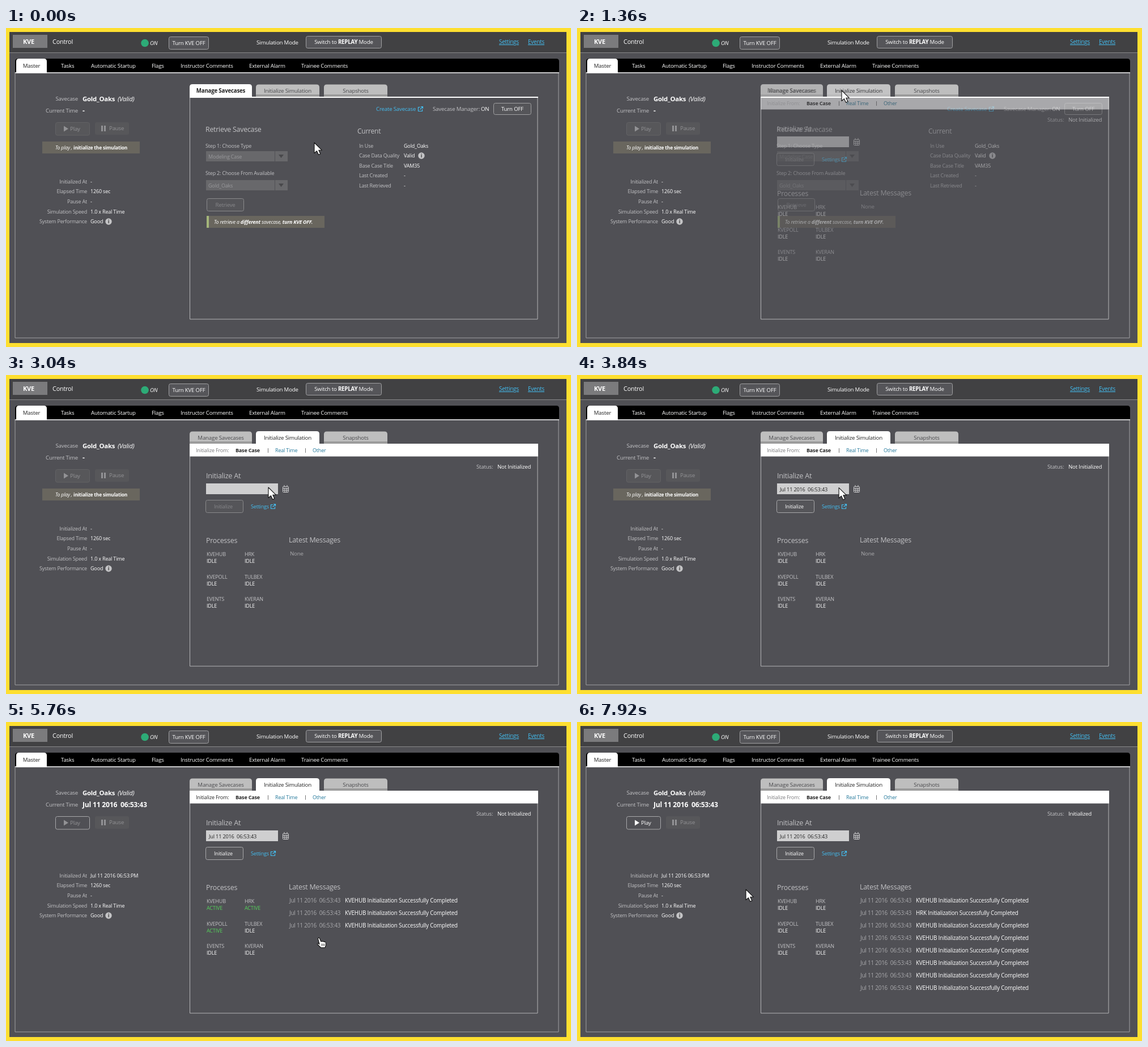
Write an HTML page that moves like this. It is 997x562 px and loops after 8000 ms.

```html
<!DOCTYPE html>
<html lang="en">
<head>
<meta charset="utf-8">
<title>Simulation control</title>
<style>
html, body { margin: 0; width: 100%; height: 100%; overflow: hidden; background: #fedf30; }
svg { display: block; width: 997px; height: 562px; }
text { font-family: "Open Sans", "Noto Sans", sans-serif; letter-spacing: -.02em; }
</style>
</head>
<body>
<svg id="stage" viewBox="0 0 997 562" xmlns="http://www.w3.org/2000/svg"></svg>
<script>
const LOOP = 8000;
const S = 9, M = 9.7, L = 12.4;
const BG = '#505055', WHITE = '#fff', PALE = '#c2c2c5', DIM = '#88888b', LINK = '#43bdf0', BLUE = '#23789b';
const STAMP = 'Jul 11 2016\u00a0\u00a006:53:43';

// y is the middle of the capitals; *stars* mark bold words
function text(x, y, str, size = M, fill = WHITE, attrs = '') {
  const body = str.replace(/\*(.+?)\*/g, '<tspan font-weight="700">$1</tspan>');
  return `<text x="${x}" y="${y + size * .36}" font-size="${size}" fill="${fill}" ${attrs}>${body}</text>`;
}
const MID = 'text-anchor="middle"', END = 'text-anchor="end"', BOLD = 'font-weight="700"', ITALIC = 'font-style="italic"';
const rect = (x, y, x2, y2, fill, attrs = '') =>
  `<rect x="${x}" y="${y}" width="${x2 - x}" height="${y2 - y}" fill="${fill}" ${attrs}/>`;
const path = (d, fill, attrs = '') => `<path d="${d}" fill="${fill}" ${attrs}/>`;
const button = (x, y, x2, y2, label, color = WHITE, stroke = '#a0a0a2', size = M) =>
  rect(x + .5, y + .5, x2 - .5, y2 - .5, '#555559', `rx="3" stroke="${stroke}"`) +
  text((x + x2) / 2, (y + y2) / 2, label, size, color, MID);
const info = (x, y) => `<circle cx="${x}" cy="${y}" r="5.7" fill="#c4c4c6"/>` +
  text(x, y, 'i', 9, '#444', MID + ' font-weight="700"');
const external = (x, y) => path(`M${x + 4} ${y + 1.5}h-3.5v7h7v-3.5M${x + 3.5} ${y + 5.5}l5-5m-3.5 0h3.5v3.5`,
  'none', `stroke="${LINK}" stroke-width="1.2"`);
const tabShape = (x, x2, y, y2, fill) =>
  path(`M${x} ${y2}V${y + 5}q0 -5 5 -5H${x2 - 5}q5 0 5 5V${y2}z`, fill);

function tab(x, x2, label, active, weight = '') {
  const shape = active ? tabShape(x, x2, 99, 123, WHITE)
    : tabShape(x, x2, 99.5, 121, '#bebebe') + rect(x, 117, x2, 121, '#9b9b9b');
  return shape + text((x + x2) / 2, 110.5, label, M, active ? '#222' : '#4b4b4e', MID + weight);
}

function frame() {
  const menu = [[97, 'Tasks'], [150, 'Automatic Startup'], [257, 'Flags'], [308, 'Instructor Comments'],
    [429, 'External Alarm'], [521, 'Trainee Comments']];
  return rect(0, 0, 997, 562, '#fedf30') + rect(6, 7, 989, 555, BG) +
    rect(6, 7, 989, 43, '#414143') + rect(6, 43, 989, 44, '#89898b') +
    rect(12, 12, 73, 35, '#7b7b7d') + text(40, 24, 'KVE', 11, WHITE, MID + ' ' + BOLD) +
    text(82, 24, 'Control', 10.9) +
    '<circle cx="245" cy="26.5" r="6.8" fill="#2dab77"/>' + text(254, 27, 'ON', M, WHITE, ITALIC) +
    button(287, 15, 358, 38, 'Turn KVE OFF') + text(442, 25.5, 'Simulation Mode') +
    button(529, 14, 663, 36, 'Switch to *REPLAY* Mode') +
    text(870, 24.5, 'Settings', 9.9, LINK, 'text-decoration="underline"') +
    text(921, 24.5, 'Events', 9.9, LINK, 'text-decoration="underline"') +
    path('M16 78V546H975V78', 'none', 'stroke="#a0a0a3"') +
    tabShape(16, 976, 54, 78, '#000') + rect(16, 78, 976, 79.6, '#e8e8e8') +
    tabShape(18, 72, 54, 79.5, WHITE) + text(45, 66.5, 'Master', M, '#222', MID) +
    menu.map(([x, s]) => text(x, 66.5, s)).join('');
}

function sidebar() {
  const rows = ['Initialized At', 'Elapsed Time', 'Pause At', 'Simulation Speed', 'System Performance'];
  const values = ['', '1260 sec', '-', '1.0 x Real Time', 'Good'];
  return text(127, 125, 'Savecase', M, PALE, END) + text(135, 124.5, 'Gold_Oaks', 11.4, WHITE, BOLD) +
    text(197, 124.5, '(Valid)', 11.3, WHITE, ITALIC) + text(127, 145.5, 'Current Time', M, PALE, END) +
    rect(157, 166, 217, 188, '#57575a', 'rx="3"') + rect(168, 172, 171, 182, '#929295') +
    rect(173, 172, 176, 182, '#929295') + text(182, 177, 'Pause', M, '#929295') +
    rows.map((s, i) => text(143, 270.5 + 17.6 * i, s, S, PALE, END) + text(149, 270.5 + 17.6 * i, values[i], S)).join('') +
    info(181, 341);
}
const playFace = color => path('M102 172.5l8 5 -8 5z', color) + text(113, 177.5, 'Play', M, color);
const idleSide = () => text(135, 145.5, '-', 12, WHITE, BOLD) + text(149, 270.5, '-', S) +
  rect(64, 200, 236, 221, '#69665e') + text(87, 211, 'To play ,', 8.7, WHITE, ITALIC) +
  text(119, 211, 'initialize the simulation', 8.4, WHITE, BOLD);
const startedSide = () => text(135, 145.5, STAMP, 12.2, WHITE, BOLD) + text(149, 270.5, 'Jul 11 2016 06:53:PM', 9.1) +
  rect(87.5, 166.5, 147.5, 189, 'none', 'rx="3" stroke="#a8a8aa"');

function managePage() {
  const select = (y, label) => rect(353, y, 474, y + 18, '#68686b') + rect(475, y, 497, y + 18, '#68686b') +
    path(`M481 ${y + 6}h9l-4.5 6z`, '#48484b') + text(357, y + 9.5, label, S, '#99999c');
  const facts = [['In Use', 'Gold_Oaks'], ['Case Data Quality', 'Valid'], ['Base Case Title', 'VAM35'],
    ['Last Created', '-'], ['Last Retrieved', '-']];
  return tab(324, 434, 'Manage Savecases', true, ' ' + BOLD) + tab(441, 553, 'Initialize Simulation', false) +
    text(653, 143, 'Create Savecase', M, LINK) + external(727, 138) +
    text(753, 143, 'Savecase Manager:', M, PALE) + text(838, 143, 'ON') +
    button(860, 132, 927, 153, 'Turn OFF') +
    text(352, 178.5, 'Retrieve Savecase', L, PALE) + text(352, 208, 'Step 1: Choose Type', S, PALE) +
    select(217, 'Modeling Case') + text(352, 255.5, 'Step 2: Choose From Available', S, PALE) +
    select(268, 'Gold_Oaks') + button(354, 300, 420, 323, 'Retrieve', DIM, '#89898b') +
    rect(354, 331, 562, 352, '#69665e') + rect(354, 331, 358, 352, '#a4b67a') +
    text(367, 342, 'To retrieve a *different* savecase, *turn KVE OFF.*', 8.8, WHITE, ITALIC) +
    text(620, 181.5, 'Current', 12, PALE) +
    facts.map(([a, b], i) => text(623, 207.5 + 17.5 * i, a, S, PALE) + text(702, 207.5 + 17.5 * i, b, S)).join('') +
    info(733, 225);
}

const PROCS = [['KVEHUB', 354, 316], ['HRK', 421, 316], ['KVEPOLL', 354, 355.5],
  ['TULBEX', 421, 355.5], ['EVENTS', 354, 395], ['KVERAN', 421, 395]];
const status = (i, label, fill) => text(PROCS[i][1], PROCS[i][2] + 12, label, S, fill);

function initPage() {
  const calendar = rect(488.5, 196.5, 498.5, 206.5, 'none', 'rx="1" stroke="#d0d0d2"') +
    path('M488 199.5h11M488 203h11M492 199v8M495.5 199v8M491 194v3M496 194v3', 'none', 'stroke="#d0d0d2"');
  return tab(324, 434, 'Manage Savecases', false) + tab(441, 553, 'Initialize Simulation', true) +
    rect(324, 121, 939, 143.5, WHITE) + text(405, 133, 'Base Case', S, '#222', BOLD) +
    text(475, 133, 'Real Time', S, BLUE) + text(541, 133, 'Other', S, BLUE) +
    rect(462, 129, 463, 137, '#777') + rect(528, 129, 529, 137, '#777') +
    text(830, 161.5, 'Status:', M, PALE) + text(353, 177, 'Initialize At', 12.7, PALE) +
    rect(353, 191, 480, 210, '#cfcfd0') + calendar + text(432, 232, 'Settings', S, LINK) + external(467, 227) +
    text(353, 292, 'Processes', L, PALE) + text(499, 290.5, 'Latest Messages', L, PALE) +
    PROCS.map(([s, x, y]) => text(x, y, s, S, PALE)).join('') +
    [3, 4, 5].map(i => status(i, 'IDLE')).join('');
}
const message = (row, from = 'KVEHUB') => text(500, 314.5 + 22 * row, STAMP, 9.9, '#aaaaad') +
  text(598, 314.5 + 22 * row, from + ' Initialization Successfully Completed', 9.9);

const clamp = v => Math.max(0, Math.min(1, v));
const ramp = (t, a, b) => clamp((t - a) / (b - a));
const ease = p => p * p * (3 - 2 * p);

const opened = t => ramp(t, 1250, 1470);
const dated = t => ramp(t, 3320, 3560);
const began = t => ramp(t, 5000, 5200);
const done = t => ramp(t, 6520, 6750);
const step = (t, i) => ramp(t, 5040 + 200 * i, 5240 + 200 * i);
const off = f => t => 1 - f(t);
const on = f => t => opened(t) * f(t);

// layers are created in paint order, each with its opacity over time
const layers = [];
function layer(markup, opacity) {
  layers.push(opacity);
  return `<g class="layer">${markup}</g>`;
}
const running = i =>
  layer(status(i, 'IDLE'), on(t => 1 - step(t, i) + done(t))) +
  layer(status(i, 'ACTIVE', '#55d25b'), t => step(t, i) * (1 - done(t))) +
  layer(message(i), t => step(t, i) * (i === 1 ? 1 - done(t) : 1));

const arrow = path('M0 0V18.5L4.4 14.6 7.5 21.3 10.8 19.8 7.8 13.3H13.5z', WHITE,
  'stroke="#111" stroke-width="1.1" stroke-linejoin="round"');
const hand = path('M-1.5 1.5Q-1 -.5 1 .5L4 7Q6 5.5 7 7 9 6 9.8 7.5 12 7 12.3 9V13.5L11 17.5H3.5L-2 12Q-3.5 9.5 -1 10L1 11.5z',
  WHITE, 'stroke="#111" stroke-width="1.1" stroke-linejoin="round"') +
  path('M5 10.5v4M7.3 10.5v4M9.6 10.5v4', 'none', 'stroke="#111" stroke-width=".8"');

document.getElementById('stage').innerHTML = frame() + sidebar() +
  layer(idleSide(), off(began)) + layer(startedSide(), began) +
  layer(rect(87.5, 166.5, 147.5, 189, '#57575a', 'rx="3" stroke="#626265"') + playFace('#929295'), off(began)) +
  layer(playFace('#929295'), t => began(t) * (1 - done(t))) + layer(playFace(WHITE), done) +
  path('M324.5 122V513H938V122', 'none', 'stroke="#b4b4b6"') + rect(324, 121, 939, 123, WHITE) +
  tab(561, 673, 'Snapshots', false) +
  layer(managePage(), off(opened)) + layer(initPage(), opened) +
  layer(text(335, 133, 'Initialize From:', S, '#77777a'), on(t => 1 - began(t) + done(t))) +
  layer(text(335, 133, 'Initialize From:', S, '#222'), t => began(t) * (1 - done(t))) +
  layer(text(867, 161.5, 'Not Initialized'), on(off(done))) + layer(text(867, 161.5, 'Initialized'), done) +
  layer(button(352, 220, 419, 243, '', DIM, '#89898b') + text(367, 232, 'Initialize', S, DIM), on(off(dated))) +
  layer(button(352, 220, 419, 243, '', WHITE, '#a8a8aa') + text(367, 232, 'Initialize', S) +
    text(358, 201.5, STAMP, 9.2, '#222'), dated) +
  layer(text(501, 314.5, 'None', M, '#aaaaad'), on(off(began))) +
  [0, 1, 2].map(running).join('') +
  layer(message(1, 'HRK') + [3, 4, 5, 6, 7].map(i => message(i)).join(''), done) +
  `<g id="ring" fill="none"><circle stroke="#111" stroke-width="4.4"/><circle stroke="#fff" stroke-width="1.7"/></g>
   <g id="cursor"><g id="arrow">${arrow}</g><g id="hand">${hand}</g></g>`;

const groups = [...document.querySelectorAll('.layer')];
const [ring, cursor, arrowEl, handEl] = ['ring', 'cursor', 'arrow', 'hand'].map(id => document.getElementById(id));
const circles = ring.querySelectorAll('circle');

// pointer stops: time, x, y
const STOPS = [[40, 544, 202], [560, 461, 116], [700, 461, 116], [800, 467, 110], [2180, 467, 110],
  [2900, 463, 198], [3800, 463, 198], [4400, 394, 237], [5200, 394, 237], [5760, 552, 380],
  [6120, 592, 456], [6560, 592, 456], [6720, 589, 437], [7200, 298, 295]];

function pointer(t) {
  const next = STOPS.findIndex(s => s[0] > t);
  if (next < 1) return next ? STOPS[STOPS.length - 1] : STOPS[0];
  const a = STOPS[next - 1], b = STOPS[next], p = ease(ramp(t, a[0], b[0]));
  return a.map((v, i) => v + (b[i] - v) * p);
}

const toggle = (el, visible) => el.setAttribute('visibility', visible ? 'visible' : 'hidden');

function draw(t) {
  groups.forEach((g, i) => g.setAttribute('opacity', clamp(layers[i](t)).toFixed(3)));
  const [, x, y] = pointer(t);
  cursor.setAttribute('transform', `translate(${x.toFixed(2)} ${y.toFixed(2)})`);
  const pointing = t >= 4280 && t < 6280;
  toggle(handEl, pointing);
  toggle(arrowEl, !pointing);
  toggle(ring, t >= 4600 && t < 4860);
  ring.setAttribute('opacity', 1 - ramp(t, 4730, 4860));
  circles.forEach(c => {
    c.setAttribute('cx', 394);
    c.setAttribute('cy', 235.5);
    c.setAttribute('r', 11 + 25 * Math.max(0, t - 4600) / 120);
  });
}

const start = performance.now();
function tick() {
  draw((performance.now() - start) % LOOP);
  requestAnimationFrame(tick);
}
tick();
</script>
</body>
</html>
```
